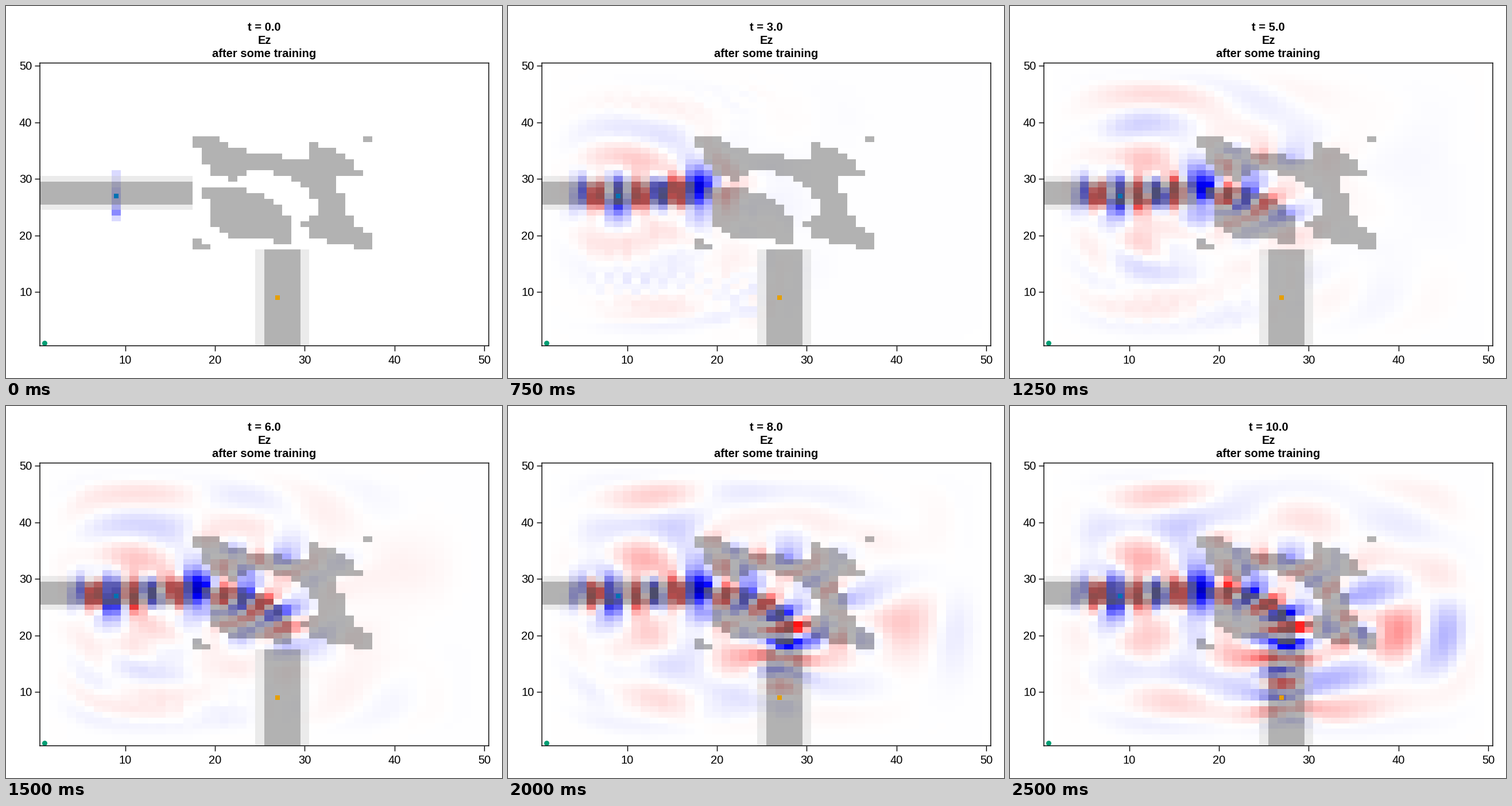
Animation of 864x648 px, one loop 2.56 s. Source, as a matplotlib script:

```python
import numpy as np
import matplotlib.pyplot as plt
from matplotlib.animation import FuncAnimation
from matplotlib.path import Path

W, H, U = 864, 648, 1.44          # stage size and pixels per layout unit
N = 50                            # grid cells per side
FRAMES, LOOP = 41, 2560
STEPS = 32                        # time steps per wave period
PER_FRAME = STEPS // 4
WAVELENGTH = 15.5                 # vacuum wavelength in cells
CLAD, CORE = 2.16, 11.6           # permittivities
DRIVE = 4.2
MARGIN = 6                        # absorbing cells at each edge

# Corner points of the three material islands, in cell coordinates
BODY = [(17.6, 37.2), (20.1, 37.3), (23.6, 34.6), (28.1, 33.95),
        (30.6, 33.4), (30.6, 36.4), (31.3, 36.2), (33.7, 34.9),
        (36.6, 30.9), (33.2, 30.6), (35.05, 23.1), (37.2, 19.8),
        (37.5, 17.7), (35.66, 17.8), (30.5, 20.04), (29.5, 22.05),
        (31.5, 23.9), (31.5, 26.3), (30.9, 26.8), (28.6, 30.2),
        (26.2, 31.2), (23.6, 31.4), (22, 29.6), (19.6, 30.8)]
LOBE = [(18.7, 28.2), (23.5, 28.4), (27.6, 24.7), (28.6, 22.8),
        (28.6, 18.6), (26.9, 18.9), (21.5, 19.94), (19.8, 22.1)]
CHIP = [(17.6, 20.1), (19.8, 17.6), (17.6, 17.6)]


def build_material():
    """Core fraction per cell, indexed [row, column]."""
    cells = np.arange(1, N + 1)
    x, y = np.meshgrid(cells, cells)
    centres = np.column_stack([x.ravel(), y.ravel()])
    g = np.zeros((N, N))
    for outline in (BODY, LOBE, CHIP):
        g[Path(outline).contains_points(centres).reshape(N, N)] = 1
    g[36, 36] = 1

    # Two feeding guides with half-filled rims
    for across, along in ((y, x), (x, y)):
        fill = np.clip(3.5 - np.abs(across - 27.5), 0, 1)
        rim = np.where(fill > 0, np.where(np.abs(across - 27.5) > 2, 0.5, 1), 0)
        g = np.where(along < 17.5, np.maximum(g, rim), g)
    return g


def mode_profile(d):
    d = np.abs(d)
    tail = np.cos(0.45 * 2.5) * np.exp(-1.15 * (d - 2.5))
    return np.where(d <= 2.5, np.cos(0.45 * d), tail)


def absorber():
    """Per-step damping that grows towards the edges."""
    i = np.arange(N)
    depth = np.clip(MARGIN - np.minimum(i, N - 1 - i), 0, None) / MARGIN
    loss = 16 * depth ** 2
    return np.exp(-(loss[:, None] + loss[None, :]) / STEPS)


def simulate(material):
    """Leapfrog wave simulation; returns the Ez field of every frame."""
    dt = WAVELENGTH / STEPS
    gain = dt / (CLAD + (CORE - CLAD) * material)
    damp = absorber()
    damp_x = (damp[1:] + damp[:-1]) / 2
    damp_y = (damp[:, 1:] + damp[:, :-1]) / 2

    rows = np.arange(23, 32)
    current = np.zeros((N, N))
    current[rows - 1, 8] = DRIVE * mode_profile(rows - 27)

    ez = np.zeros((N, N))
    hx = np.zeros((N - 1, N))
    hy = np.zeros((N, N - 1))
    fields = []
    for step in range((FRAMES - 1) * PER_FRAME + 1):
        hx = damp_x * (hx - dt * np.diff(ez, axis=0))
        hy = damp_y * (hy + dt * np.diff(ez, axis=1))
        curl = np.zeros((N, N))
        curl[1:-1, 1:-1] = (np.diff(hy, axis=1)[1:-1]
                            - np.diff(hx, axis=0)[:, 1:-1])
        phase = 2 * np.pi * step / STEPS
        ez = damp * (ez + gain * (curl - current * np.cos(phase)))
        if step % PER_FRAME == 0:
            fields.append(ez.copy())
    return fields


def paint(field, material):
    """Diverging field colours under a translucent grey material layer."""
    stops = [-1, -0.5, 0, 0.5, 1]
    channels = ([0, 0, 1, 1, 0.5], [0, 0, 1, 0, 0], [0.3, 1, 1, 0, 0])
    rgb = np.stack([np.interp(field, stops, c) for c in channels], axis=-1)
    g = material[..., None]
    alpha = 0.6 * g
    return rgb * (1 - alpha) + (1 - 0.498 * g) * alpha


material = build_material()
fields = simulate(material)

plt.rcParams["font.family"] = "Liberation Sans"
plt.rcParams["path.snap"] = False
fig = plt.figure(figsize=(W / 72, H / 72), dpi=72, facecolor="white")
ax = fig.add_axes([41 / 600, 39 / 450, 543 / 600, 342 / 450])
image = ax.imshow(paint(fields[0], material), origin="lower", aspect="auto",
                  interpolation="nearest", extent=(0.5, N + 0.5, 0.5, N + 0.5))

for x, y, marker, size, color in [(9, 27, "s", 8, "#0072B2"),
                                  (27, 9, "s", 8, "#E69F00"),
                                  (1, 1, "o", 9, "#009E73")]:
    ax.plot(x, y, marker, ms=size, mew=0, color=color)

ax.set_xlim(0.5, N + 0.5)
ax.set_ylim(0.5, N + 0.5)
ticks = range(10, 51, 10)
ax.set_xticks(ticks)
ax.set_yticks(ticks)
ax.tick_params(length=6 * U, width=U, labelbottom=False, labelleft=False)
for spine in ax.spines.values():
    spine.set_linewidth(U)


def label(x, baseline, text, ha="center", weight="normal"):
    return fig.text(x / W, 1 - baseline / H, text, ha=ha, va="baseline",
                    fontsize=14 * U, weight=weight, color="black")


for v in ticks:
    label(59.04 + (v - 0.5) * 15.638, 623, str(v))
    label(45.3, 591.84 - (v - 0.5) * 9.85 + 7.2, str(v), ha="right")

clock = label(450, 42.6, "t = 0.0", weight="bold")
label(450, 66, "Ez", weight="bold")
label(450, 89.4, "after some training", weight="bold")


def update(k):
    image.set_data(paint(fields[k], material))
    clock.set_text(f"t = {k / 4}")
    return image, clock


anim = FuncAnimation(fig, update, frames=FRAMES, interval=LOOP / FRAMES,
                     repeat=True, repeat_delay=0)
plt.show()
```
